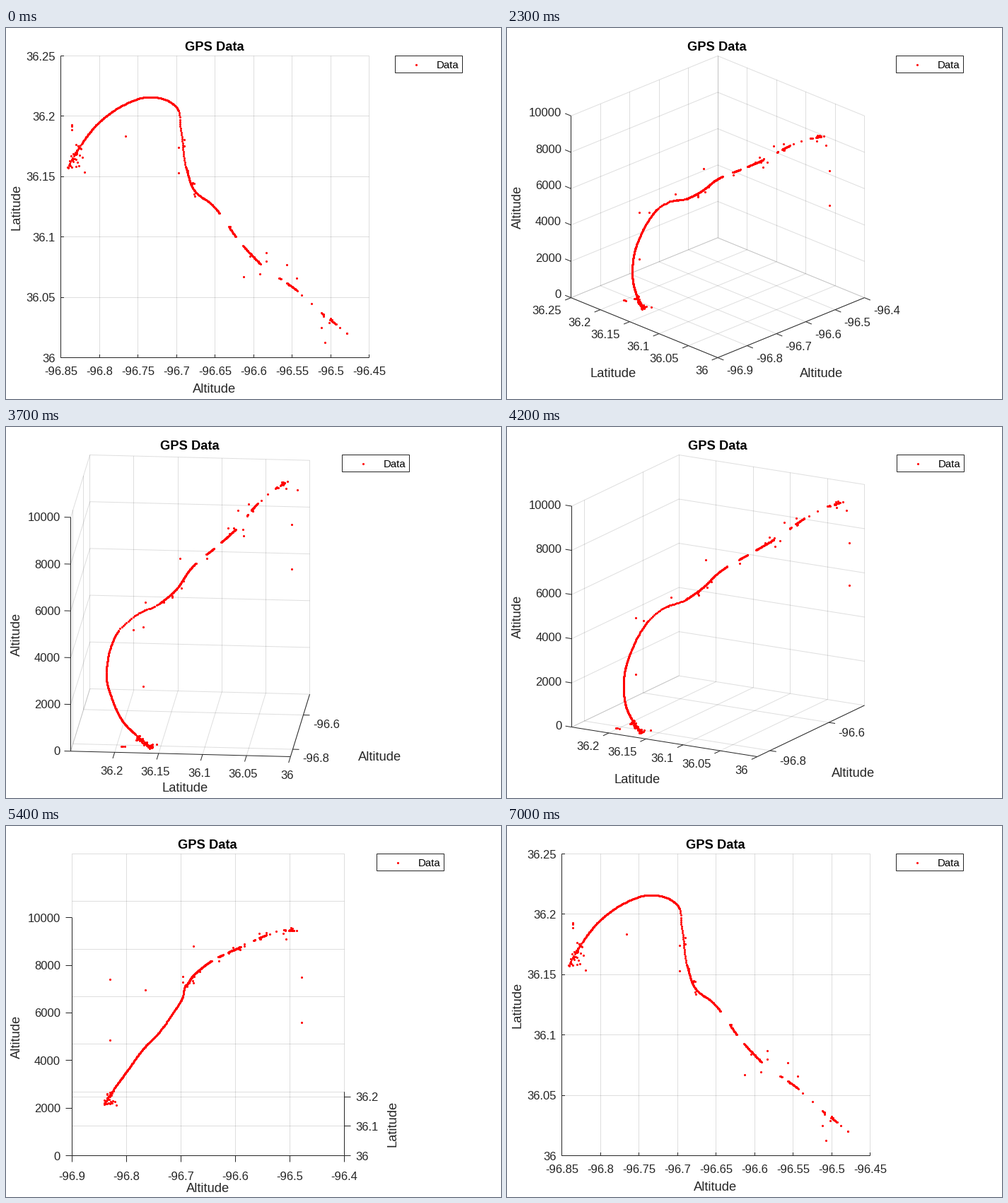
Animation of 700 by 525 pixels, one loop 7.1 s. Source, as a matplotlib script:

```python
import numpy as np
import matplotlib.pyplot as plt
from matplotlib.animation import FuncAnimation

W, H, DPI = 700, 525, 100
PT = 72 / DPI
INK, RED = (0.15, 0.15, 0.15), (1, 0, 0)
TOP, BOTTOM = 39.5, 466.5
TICK_PX, LABEL_PX, LEGEND_PX = 16.67, 18.33, 15

plt.rcParams["font.family"] = "Liberation Sans"

# Key points of the flight: chart x, chart y, height
FLIGHT = [(86, 196, 222), (103, 167, 583), (131, 132, 1130), (165, 108, 1930),
          (196, 97, 2528), (228, 102, 3508), (240, 111, 3980), (246, 142, 4680),
          (254, 198, 5330), (266, 230, 5923), (288, 247, 6430), (330, 302, 7330),
          (358, 332, 7810), (411, 371, 8600), (445, 402, 9030), (472, 423, 9160)]
# Stretches of chart x with reception after the signal gets weak
RECEPTION = [(290, 301), (314, 324), (334, 359), (385, 388), (396, 411),
             (417, 418), (430, 431), (445, 449), (457, 466), (471, 472)]
OUTLIERS = [(97, 178, 2780), (97, 178, 5330), (168, 152, 4700), (243, 168, 5380),
            (243, 204, 5400), (265, 234, 7150), (335, 351, 7700), (358, 347, 7820),
            (367, 317, 7820), (367, 329, 7820), (396, 334, 8390), (410, 353, 8560),
            (445, 423, 9040), (450, 444, 8960), (481, 431, 5350), (481, 431, 7260)]


def smooth_path(keys, step):
    """Cubic Hermite curve through the key points, sampled evenly."""
    p = np.array(keys, float)
    t = np.r_[0, np.cumsum(np.hypot(*np.diff(p[:, :2], axis=0).T))]
    slope = np.gradient(p, t, axis=0)
    s = np.arange(0, t[-1], step)
    i = np.searchsorted(t, s, side="right") - 1
    h = (t[i + 1] - t[i])[:, None]
    f = (s[:, None] - t[i][:, None]) / h
    return ((1 + 2 * f) * (1 - f) ** 2 * p[i] + f * (1 - f) ** 2 * h * slope[i]
            + f * f * (3 - 2 * f) * p[i + 1] - f * f * (1 - f) * h * slope[i + 1])


def build_data():
    rng = np.random.default_rng(4)
    path = smooth_path(FLIGHT, 1)
    x = path[:, 0]
    received = x < 290
    for start, end in RECEPTION:
        received |= (x >= start) & (x <= end)
    thin = (x < 106) | ((x > 243) & (x < 253))
    received &= ~thin | (np.arange(len(x)) % 3 == 0)

    start = path[rng.integers(0, 34, 30)] + rng.normal(0, [2, 3, 60], (30, 3))
    ground = rng.normal([99, 184, 230], [5, 9, 15], (9, 3))
    parked = np.array([(92, y, 230) for y in (136, 138, 143)])
    later = path[(x > 243) & received]
    stray = later[rng.integers(0, len(later), 22)] + rng.normal(0, [2.5, 2.5, 60], (22, 3))
    points = np.vstack([path[received], start, ground, parked, stray, OUTLIERS])
    x, y, z = points.T
    return np.array([-96.85 + (x - 77) / 1090, 36 + (466 - y) / 1708, z])


DATA = build_data()
fig = plt.figure(figsize=(W / DPI, H / DPI), dpi=DPI, facecolor="white")
ax = fig.add_axes([0, 0, 1, 1])


def line(p, q, alpha=1.0):
    """One pixel wide; upright and level lines sit on pixel centres."""
    xy = np.array([p, q], float)
    level = np.abs(xy[0] - xy[1]) < 0.01
    xy = np.where(level, np.floor(xy + 0.01) + 0.5, xy)
    ax.plot(*xy.T, color=INK, alpha=alpha, lw=PT, snap=False,
            solid_capstyle="butt", zorder=2 if alpha == 1 else 1)


def text(x, y, s, px, ha="center", rotation=0, color=INK, weight="normal"):
    """Place text by the middle of its capital height."""
    drop = 0.36 * px
    if rotation:
        x += drop
    else:
        y += drop
    ax.text(x, y, s, fontsize=px * PT, ha=ha, va="baseline", rotation=rotation,
            rotation_mode="anchor", color=color, weight=weight)


def dots(x, y):
    ax.plot(np.floor(x) + 0.5, np.floor(y) + 0.5, "o", color=RED,
            ms=3.1 * PT, mew=0, snap=False, zorder=3)


def title_and_legend(left, right, legend_x):
    text((left + right) / 2 - 1, 25, "GPS Data", LABEL_PX, color="black", weight="bold")
    ax.add_patch(plt.Rectangle((legend_x, 39.5), 95, 24, fc="white", ec=INK,
                               lw=PT, snap=False))
    dots(np.array([legend_x + 29]), np.array([51.5]))
    text(legend_x + 58.5, 52, "Data", LEGEND_PX, ha="left", color="black")


def ticks(lo, hi, step):
    first, last = np.ceil(lo / step - 1e-6), np.floor(hi / step + 1e-6)
    return np.arange(int(first), int(last) + 1) * step


def name(value):
    return f"{value:.0f}" if value >= 1000 else f"{round(value, 2):g}"


def draw_flat():
    left, right = 77.5, 513.5
    for value in ticks(-96.85, -96.45, 0.05):
        x = left + (value + 96.85) * 1090
        line((x, TOP), (x, BOTTOM), 0.15)
        line((x, BOTTOM), (x, BOTTOM - 4.5))
        text(x, 485, name(value), TICK_PX)
    for value in ticks(36, 36.25, 0.05):
        y = BOTTOM - (value - 36) * 1708
        line((left, y), (right, y), 0.15)
        line((left, y), (left + 4.5, y))
        text(70, y, name(value), TICK_PX, ha="right")
    line((left, TOP), (left, BOTTOM))
    line((left, BOTTOM), (right, BOTTOM))
    dots(left + (DATA[0] + 96.85) * 1090, BOTTOM - (DATA[1] - 36) * 1708)
    text(294.5, 509, "Altitude", LABEL_PX)
    text(13, 253, "Latitude", LABEL_PX, rotation=90)
    title_and_legend(left, right, 550.5)


def projector(az, el, left, right):
    """Orthographic view of the unit cube, stretched to fill the plot area."""
    a, e = np.radians([az, el])
    sa, ca, se, ce = np.sin(a), np.cos(a), np.sin(e), np.cos(e)
    kx = (right - left) / (ca - sa)
    ky = (BOTTOM - TOP) / (se * (ca - sa) + ce)

    def project(u, v, w):
        return np.array([left + kx * (u * ca + v * sa - sa),
                         BOTTOM - ky * (se * (v * ca - u * sa) + w * ce)])
    return project


def draw_axis(project, start, end, outward, values, limits, label, kind):
    """Axis line, ticks, tick names and label; kind is floor, side or z."""
    p, q = project(*start), project(*end)
    line(p, q)
    away = project(*np.add(start, outward)) - p
    away /= np.hypot(*away)
    gap = 16 if np.min(np.abs(away)) < 0.01 else 14
    ha = "center" if abs(away[0]) < 0.3 else "left" if away[0] > 0 else "right"
    lo, hi = limits
    for value in values:
        at = p + (q - p) * (value - lo) / (hi - lo)
        line(at, at + 9 * away)
        x, y = at + gap * away
        text(x - 0.5, y + (12 if kind == "floor" else 0), name(value), TICK_PX, ha=ha)

    mid = (p + q) / 2
    if kind == "floor":
        along = (q - p) / np.hypot(*(q - p))
        normal = np.array([-along[1], along[0]])
        normal *= np.sign(normal @ away)
        c = along @ away
        slide = along * c * (120 * abs(c) - 63)
        x, y = mid + normal * (45 + 79 * abs(normal[0])) + slide
        text(x - 0.5, y, label, LABEL_PX)
    else:
        text(13.5 if kind == "z" else 544.5, mid[1], label, LABEL_PX, rotation=90)


def plot_area(az, returning, wide_names):
    """Left and right edges, leaving room for labels on the right."""
    if az == 0:
        return 93.5, 469.5 if wide_names else 478.5
    if az == -90:
        return 93.5, 473.5
    return 90.5 + returning, min(505.5, 394.5 + 7 * (90 + az))


def draw_box(az, el, returning):
    fine_depth = el >= 35
    left, right = plot_area(az, returning, fine_depth)
    project = projector(az, el, left, right)
    x_len, y_len, z_len = (np.hypot(*(project(*k) - project(0, 0, 0))) for k in np.eye(3))

    # Tick steps and limits follow the length of each edge on screen.
    x_step = 0.1 if x_len > 210 else 0.2
    y_step = 0.05 if y_len > 210 or (az == 0 and fine_depth) else 0.1
    z_step = 2000 if z_len > 175 else 5000 if z_len > 60 else 10000
    cropped = x_step == 0.2 and returning
    x_lim = (-96.9 if x_step == 0.1 else -96.843, -96.479 if cropped else -96.4)
    y_lim = (36, 36.25 if y_step == 0.05 else 36.2165)
    z_lim = (0, 10000)
    lims = (x_lim, y_lim, z_lim)
    xt, yt, zt = (ticks(*lim, step) for lim, step in zip(lims, (x_step, y_step, z_step)))
    us, vs, ws = ((t - lo) / (hi - lo) for t, (lo, hi) in zip((xt, yt, zt), lims))

    def grid(a, b):
        line(project(*a), project(*b), 0.15)

    back_wall, side_wall = el < 90 and az > -90, el < 90 and az < 0
    for u in us:
        grid((u, 0, 0), (u, 1, 0))
        if back_wall:
            grid((u, 1, 0), (u, 1, 1))
    for v in vs:
        grid((0, v, 0), (1, v, 0))
        if side_wall:
            grid((1, v, 0), (1, v, 1))
    for w in ws:
        if back_wall:
            grid((0, 1, w), (1, 1, w))
        if side_wall:
            grid((1, 0, w), (1, 1, w))

    front = int(az == 0)
    draw_axis(project, (0, 0, 0), (1, 0, 0), (0, -1, 0), xt, x_lim, "Altitude",
              "side" if az == -90 else "floor")
    draw_axis(project, (front, 0, 0), (front, 1, 0), (2 * front - 1, 0, 0),
              yt[:-1] if cropped else yt, y_lim, "Latitude", "side" if front else "floor")
    if el < 90:
        draw_axis(project, (0, 1 - front, 0), (0, 1 - front, 1),
                  (0, 1, 0) if az <= -45 else (-1, 0, 0), zt, z_lim, "Altitude", "z")

    dots(*project(*((d - lo) / (hi - lo) for d, (lo, hi) in zip(DATA, lims))))
    title_and_legend(left, right, right + 45 + returning)


def view(n):
    """Tilt down, swing to the side, swing back to the front, tilt up."""
    if n < 26:
        return -45, 90 - 5 * (n - 10)
    if n < 36:
        return -45 - 5 * (n - 26), 15
    if n < 55:
        return -90 + 5 * (n - 36), 15
    return 0, 15 + 5 * (n - 55)


def draw(n):
    ax.cla()
    ax.set_axis_off()
    ax.set_xlim(0, W)
    ax.set_ylim(H, 0)
    if n < 10 or n == 70:
        draw_flat()
    else:
        draw_box(*view(n), returning=n > 36)
    return []


animation = FuncAnimation(fig, draw, frames=71, interval=100, init_func=lambda: [],
                          repeat=True, repeat_delay=0, blit=False)
plt.show()
```
